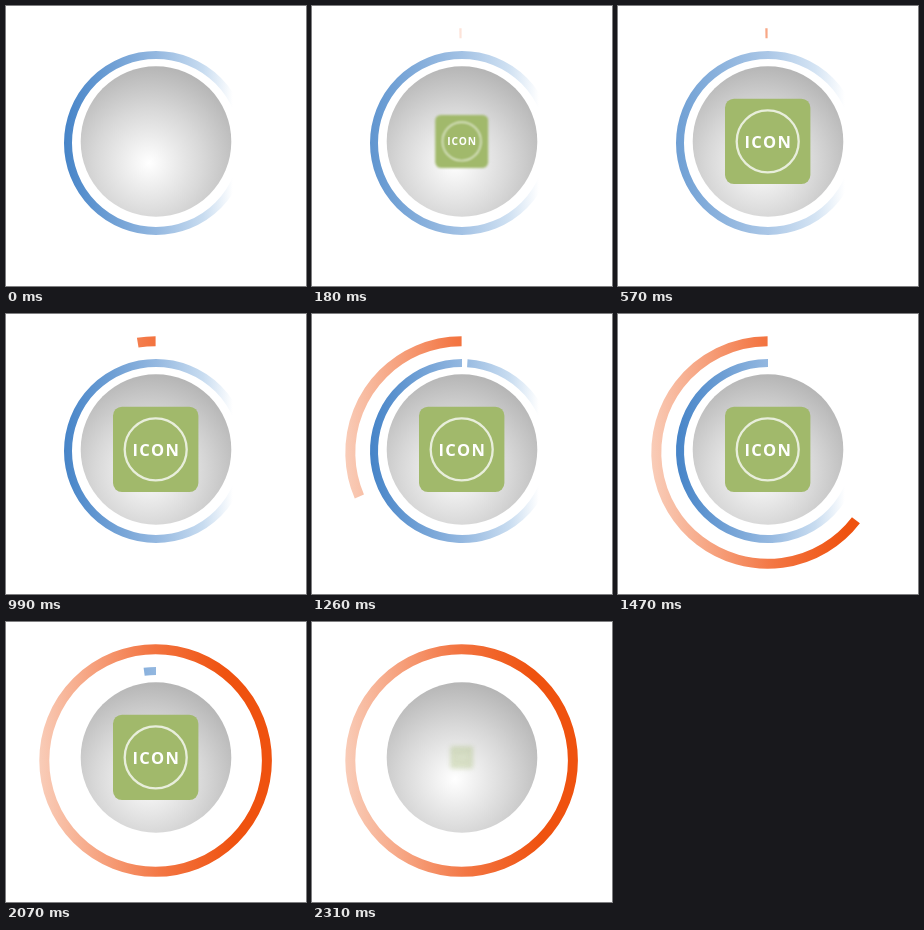
An HTML page with a canvas that plays this animation: 300 px wide and 280 px high, repeating every 2340 ms.

```html
<!DOCTYPE html>
<html lang="en">
<head>
<meta charset="utf-8">
<title>Icon rings</title>
<style>
  html, body { margin: 0; width: 100%; height: 100%; overflow: hidden; background: #fff; }
  canvas { display: block; width: 300px; height: 280px; }
</style>
</head>
<body>
<canvas id="stage" width="300" height="280"></canvas>
<script>
const ctx = document.getElementById('stage').getContext('2d');
const LOOP = 2340, STEP = 30, TOP = -Math.PI / 2, TURN = Math.PI * 2;

const clamp = v => Math.min(1, Math.max(0, v));
const easeSine = v => 0.5 - 0.5 * Math.cos(Math.PI * clamp(v));

function addStops(gradient, stops) {
  for (const [at, color] of stops) gradient.addColorStop(at, color);
  return gradient;
}

const blue = addStops(ctx.createLinearGradient(58, 0, 232, 0), [
  [0, '#4684c8'], [0.53, '#94b8e0'], [0.8, '#c8dcf0'], [0.97, '#ffffff']
]);
const orange = addStops(ctx.createLinearGradient(33, 150, 266, 138), [
  [0, '#f9cdb9'], [0.5, '#f37643'], [0.82, '#ef520f'], [1, '#ef520f']
]);
const silver = addStops(ctx.createRadialGradient(143, 157, 0, 143, 157, 100), [
  [0, '#ffffff'], [0.54, '#d8d8d8'], [1, '#b3b3b3']
]);

function ring(x, y, radius, width, from, to, color, alpha) {
  if (to <= from || alpha <= 0) return;
  ctx.globalAlpha = alpha;
  ctx.strokeStyle = color;
  ctx.lineWidth = width;
  ctx.beginPath();
  ctx.arc(x, y, radius, from, to);
  ctx.stroke();
  ctx.globalAlpha = 1;
}

function iconScale(t) {
  if (t > 2250) return 1 - (t - 2250) / 82;
  if (t >= 570) return 1;
  return (1 - Math.exp(-t / 207)) / (1 - Math.exp(-570 / 207));
}

function drawIcon(t) {
  const scale = iconScale(t);
  if (scale <= 0.01) return;
  const softness = 5 * (1 - scale);
  ctx.save();
  ctx.translate(149.7, 135.4);
  ctx.scale(scale, scale);
  ctx.globalAlpha = clamp((scale - 0.1) * 2);
  if (softness > 0.3) ctx.filter = `blur(${softness * 0.6}px)`;
  ctx.fillStyle = '#a1b96b';
  ctx.beginPath();
  ctx.roundRect(-42.7, -42.7, 85.4, 85.4, 9);
  ctx.fill();
  ctx.strokeStyle = '#e8eedb';
  ctx.lineWidth = 2.3;
  ctx.beginPath();
  ctx.arc(0, 0, 31, 0, TURN);
  ctx.stroke();
  if (scale > 0.5) ctx.filter = 'none';
  ctx.fillStyle = '#fff';
  ctx.font = 'bold 16.5px "Open Sans", sans-serif';
  ctx.letterSpacing = '1.4px';
  ctx.textAlign = 'center';
  ctx.fillText('ICON', 0.7, 6.3);
  ctx.restore();
}

function draw(t) {
  ctx.fillStyle = '#fff';
  ctx.fillRect(0, 0, 300, 280);

  const erased = easeSine((t - 1200) / 960) * TURN;
  const blueAlpha = t < 900 ? 1 - 0.24 * Math.sin(Math.PI * t / 900) : 1;
  ring(150, 137, 88, 8, TOP + erased, TOP + TURN, blue, blueAlpha);

  const drawn = Math.max(0.02, easeSine((t - 890) / 976) * TURN);
  ring(149.6, 138.5, 111.3, 10, TOP - drawn, TOP, orange, clamp(t / 900));

  ctx.fillStyle = silver;
  ctx.beginPath();
  ctx.arc(150, 135.5, 75.3, 0, TURN);
  ctx.fill();

  drawIcon(t);
}

const start = performance.now();
function tick() {
  const t = (performance.now() - start) % LOOP;
  draw(Math.floor(t / STEP) * STEP);
  requestAnimationFrame(tick);
}
tick();
</script>
</body>
</html>
```
